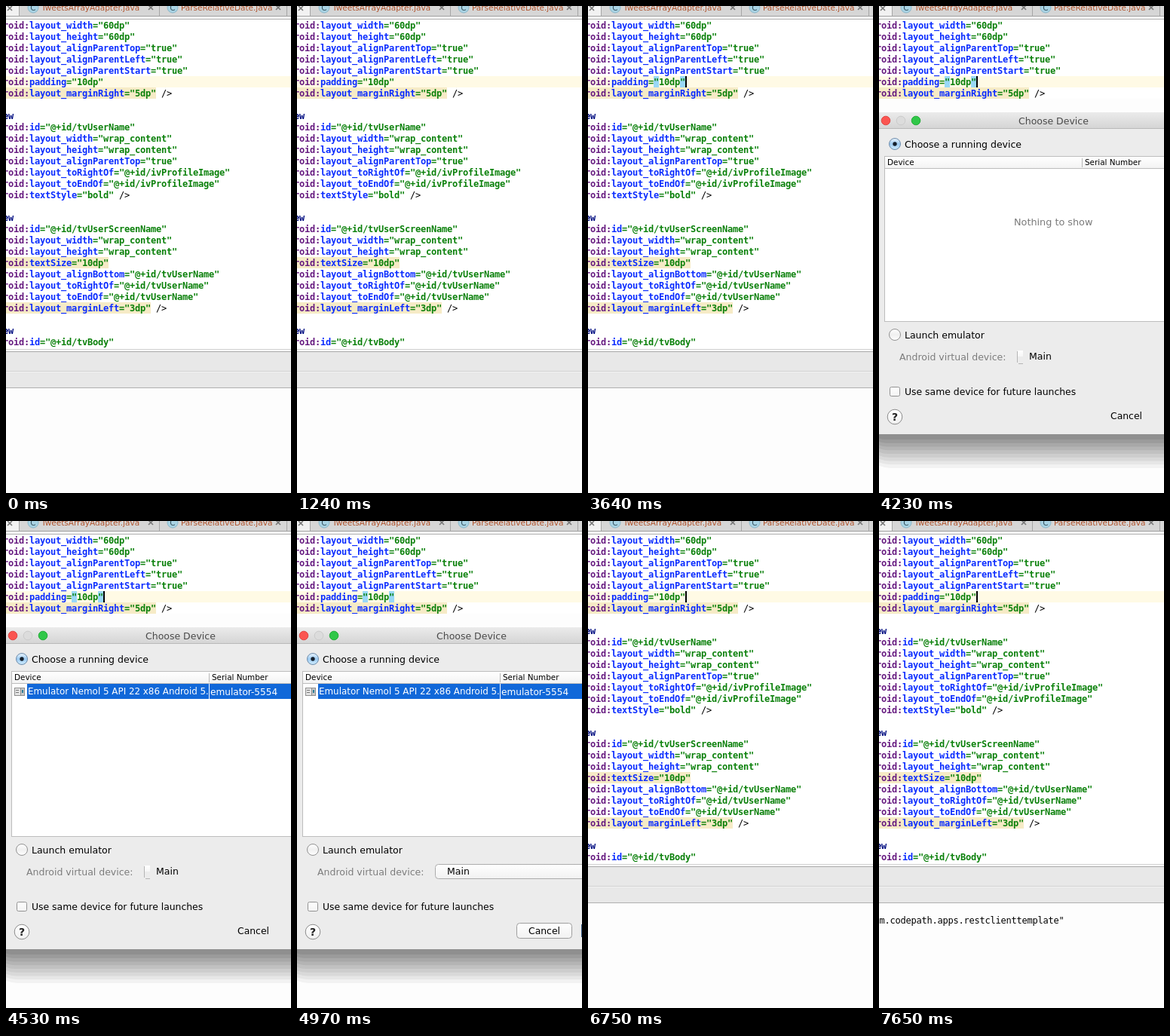
Write an HTML page with a canvas that moves like this. It is 378 by 646 pixels and loops after 8 s.

```html
<!DOCTYPE html>
<html lang="en">
<head>
<meta charset="utf-8">
<title>Layout editor</title>
<style>
html, body { margin: 0; width: 100%; height: 100%; overflow: hidden; background: #fff; }
canvas { display: block; }
</style>
</head>
<body>
<canvas id="stage" width="378" height="646"></canvas>
<script>
const W = 378, H = 646, LOOP = 8000;
const ctx = document.getElementById('stage').getContext('2d');
const MONO = '12px "DejaVu Sans Mono", monospace';
const SANS = '"DejaVu Sans", sans-serif';
const CELL = 7, ROW = 15, LEFT = -4, TOP = 18, CARET_ROW = 5;
const INK = { prefix: '#661a80', name: '#0a2cff', value: '#0a800a', tag: '#000c80', plain: '#000' };

const CODE = [
  'layout_width="60dp"',
  'layout_height="60dp"',
  'layout_alignParentTop="true"',
  'layout_alignParentLeft="true"',
  'layout_alignParentStart="true"',
  'padding="10dp"',
  '!layout_marginRight="5dp" />',
  '',
  'ew',
  'id="@+id/tvUserName"',
  'layout_width="wrap_content"',
  'layout_height="wrap_content"',
  'layout_alignParentTop="true"',
  'layout_toRightOf="@+id/ivProfileImage"',
  'layout_toEndOf="@+id/ivProfileImage"',
  'textStyle="bold" />',
  '',
  'ew',
  'id="@+id/tvUserScreenName"',
  'layout_width="wrap_content"',
  'layout_height="wrap_content"',
  '!textSize="10dp"',
  'layout_alignBottom="@+id/tvUserName"',
  'layout_toRightOf="@+id/tvUserName"',
  'layout_toEndOf="@+id/tvUserName"',
  '!layout_marginLeft="3dp" />',
  '',
  'ew',
  'id="@+id/tvBody"'
];

const between = (t, from, to) => t >= from && t < to;

function rect(x, y, w, h, color) {
  ctx.fillStyle = color;
  ctx.fillRect(x, y, w, h);
}

function roundBox(x, y, w, h, r, fill, stroke) {
  ctx.beginPath();
  ctx.roundRect(x, y, w, h, r);
  ctx.fillStyle = fill;
  ctx.fill();
  if (stroke) {
    ctx.strokeStyle = stroke;
    ctx.lineWidth = 1;
    ctx.stroke();
  }
}

const disc = (x, y, r, fill, stroke) => roundBox(x - r, y - r, 2 * r, 2 * r, r, fill, stroke);

function fade(y0, y1, ...colors) {
  const g = ctx.createLinearGradient(0, y0, 0, y1);
  colors.forEach((c, i) => g.addColorStop(i / (colors.length - 1), c));
  return g;
}

function label(text, x, y, size = 12.5, color = '#000', weight = '') {
  ctx.font = `${weight} ${size}px ${SANS}`;
  ctx.fillStyle = color;
  ctx.fillText(text, x, y);
}

// Draws text on the editor's whole-pixel character grid, returns the end x.
function mono(text, x, y, color, bold = true) {
  ctx.font = (bold ? 'bold ' : '') + MONO;
  ctx.fillStyle = color;
  for (const ch of text) {
    ctx.fillText(ch, x, y);
    x += CELL;
  }
  return x;
}

function codeLine(line, row) {
  const top = TOP + row * ROW, base = top + 12;
  if (!line) return;
  if (line === 'ew') {
    mono(line, LEFT, base, INK.tag);
    return;
  }
  const [, mark, name, value, tail] = line.match(/^(!?)(\w+)(="[^"]*")(.*)$/);
  if (mark) rect(0, top, LEFT + (5 + name.length + value.length) * CELL, ROW, '#f6ebc6');
  let x = mono('roid:', LEFT, base, INK.prefix);
  x = mono(name, x, base, INK.name);
  x = mono(value, x, base, INK.value);
  mono(tail, x, base, INK.plain, false);
}

function cross(x, y) {
  ctx.strokeStyle = '#777';
  ctx.lineWidth = 1.6;
  ctx.beginPath();
  ctx.moveTo(x - 3, y - 3);
  ctx.lineTo(x + 3, y + 3);
  ctx.moveTo(x + 3, y - 3);
  ctx.lineTo(x - 3, y + 3);
  ctx.stroke();
}

function fileTab(x, title, closeX) {
  disc(x, 2, 7, '#a9d3e4', '#8bb8ca');
  label('C', x - 3.7, 6, 10.5, '#34525e');
  label(title, x + 11, 6, 10.5, '#b0532c');
  cross(closeX, 2);
}

function tabBar() {
  rect(0, 0, W, 13, '#d6d6d6');
  rect(0, 0, 17, 13, '#f2f2f2');
  for (const x of [17, 203, 372]) rect(x, 0, 1, 13, '#a6a6a6');
  rect(0, 13, W, 1, '#a2a2a2');
  rect(0, 14, W, 3, '#f4f4f4');
  rect(0, 17, W, 1, '#b4b4b4');
  cross(5, 3);
  fileTab(36, 'TweetsArrayAdapter.java', 192);
  fileTab(221, 'ParseRelativeDate.java', 361);
}

function editor(t) {
  const top = TOP + CARET_ROW * ROW;
  rect(0, 0, W, H, '#fff');
  rect(0, top, W, ROW, '#fffae5');
  if (between(t, 2140, 6750))
    for (const col of [13, 18]) rect(LEFT + col * CELL, top, CELL, ROW, '#99d8f7');
  CODE.forEach(codeLine);
  const caretOn = between(t, 2140, 3040) || between(t, 3640, 4680) ||
    between(t, 6460, 7500) || t >= 7650;
  if (caretOn) rect(129, top, 2, ROW, '#000');
  tabBar();
}

function consolePanel(t) {
  rect(0, 455, W, 1, '#d0d0d0');
  rect(0, 458, W, 1, '#a8a8a8');
  rect(0, 459, W, 48, '#e8e8e8');
  rect(0, 484, W, 1, '#d2d2d2');
  rect(0, 485, W, 1, '#f2f2f2');
  rect(0, 506, W, 1, '#b0b0b0');
  rect(0, 507, W, H - 507, '#fdfdfd');
  if (t >= 7350) mono('m.codepath.apps.restclienttemplate"', 0.5, 534, '#000', false);
}

function dialogShadow() {
  rect(0, 123, W, H - 123, '#fdfdfd');
  const bands = 9;
  for (let i = 0; i < bands; i++) {
    const k = i / (bands - 1), tone = Math.round(242 - 99 * k);
    roundBox(-26 + 14 * k, 300, 500, 313 - 300 * 0 - 38 * k, 42 - 22 * k, `rgb(${tone},${tone},${tone})`);
  }
}

function deviceTable(filled) {
  rect(7, 199, W, 220, '#bdbdbd');
  rect(8, 200, W, 15, fade(200, 215, '#fff', '#f3f3f3'));
  rect(8, 216, W, 202, '#fff');
  rect(269, 202, 1, 12, '#b8b8b8');
  label('Device', 11, 211, 10.4);
  label('Serial Number', 273, 211, 10.4);
  if (!filled) {
    label('Nothing to show', 179, 291, 12.8, '#7a7a7a');
    return;
  }
  rect(28, 216, W - 28, 20, '#1168d9');
  rect(269, 216, 1, 20, '#fff');
  rect(11, 221, 14, 11, '#8d8d8d');
  rect(12, 222, 7, 9, '#e4e4e4');
  rect(13, 224, 4, 1, '#777');
  rect(13, 227, 4, 1, '#777');
  rect(20, 222, 4, 9, '#c9c9c9');
  rect(21, 224, 2, 4, '#2f7d96');
  label('Emulator Nemol 5 API 22 x86 Android 5.', 29, 230, 11.9, '#fff');
  label('emulator-5554', 271, 231, 12.1, '#fff');
}

function dialogControls(painted) {
  disc(21, 183, 7.5, fade(175, 191, '#f2f9ff', '#9ccbf2', '#d3efff'), '#6d8cab');
  disc(21, 183, 2.7, '#15202c');
  label('Choose a running device', 34, 188);
  disc(21, 436, 7.5, fade(428, 444, '#fff', '#f0f0f0', '#fff'), '#929292');
  label('Launch emulator', 34, 441);
  label('Android virtual device:', 27, 470, 12.5, '#7c7c7c');

  if (painted) {
    roundBox(183.5, 455.5, 220, 19, 4, fade(455, 475, '#fff', '#f1f1f1'), '#acacac');
    roundBox(291.5, 533.5, 73, 20, 4, fade(533, 554, '#fff', '#f1f1f1'), '#9e9e9e');
    rect(377, 535, 1, 17, '#32537f');
  } else {
    roundBox(183.5, 455.5, 9, 19, [4, 0, 0, 4], '#ececec');
    rect(184, 457, 7, 8, fade(457, 465, '#fff', '#f6f6f6'));
    rect(183, 458, 1, 15, '#b5b5b5');
    rect(185, 474, 6, 1, '#b5b5b5');
  }
  label('Main', 199, 469);
  roundBox(14.5, 505.5, 13, 12, 2, fade(505, 518, '#fff', '#f2f2f2'), '#929292');
  label('Use same device for future launches', 34, 516, 12.4);
  disc(21, 545, 9.8, fade(535, 555, '#fff', '#f0f0f0'), '#8c8c8c');
  label('?', 17, 550, 14, '#222', 'bold');
  label('Cancel', 307, 548, 12.4);
}

function dialog(t) {
  dialogShadow();
  rect(0, 141, W, 427, '#ececec');
  rect(0, 141, W, 22, fade(141, 163, '#ebebeb', '#d4d4d4'));
  rect(0, 162, W, 1, '#b9b9b9');
  disc(9, 152, 5.8, '#fb5551', '#df4744');
  disc(29, 152, 5.8, '#dcdcdc', '#cbcbcb');
  disc(49, 152, 5.8, '#30c748', '#24ac38');
  label('Choose Device', 185, 157, 12.5, '#4a4a4a');
  deviceTable(t >= 4530);
  dialogControls(t >= 4680);
}

function arrow(x, y) {
  const points = [[1, 1], [1, 14], [4, 11.2], [6.2, 16.3], [8.6, 15.2], [6.4, 10.3], [10.6, 10.3]];
  ctx.beginPath();
  for (const [dx, dy] of points) ctx.lineTo(x + dx, y + dy);
  ctx.closePath();
  ctx.strokeStyle = '#fff';
  ctx.lineWidth = 2;
  ctx.stroke();
  ctx.fillStyle = '#000';
  ctx.fill();
}

function textPointer(x, y) {
  ctx.strokeStyle = '#222';
  ctx.lineWidth = 1;
  ctx.beginPath();
  ctx.moveTo(x + 1, y + 0.5);
  ctx.quadraticCurveTo(x + 4.5, y + 0.5, x + 4.5, y + 3);
  ctx.lineTo(x + 4.5, y + 14);
  ctx.quadraticCurveTo(x + 4.5, y + 16.5, x + 1, y + 16.5);
  ctx.moveTo(x + 8, y + 0.5);
  ctx.quadraticCurveTo(x + 4.5, y + 0.5, x + 4.5, y + 3);
  ctx.moveTo(x + 8, y + 16.5);
  ctx.quadraticCurveTo(x + 4.5, y + 16.5, x + 4.5, y + 14);
  ctx.moveTo(x + 2.5, y + 11.5);
  ctx.lineTo(x + 6.5, y + 11.5);
  ctx.stroke();
}

const POINTER = [
  [500, 800, arrow, 134, 188],
  [800, 940, arrow, 62, 68],
  [940, 1090, arrow, 35, 47],
  [1090, 1240, arrow, 3, 20],
  [4380, 4530, arrow, 274, 342],
  [6460, 6610, textPointer, 161, 398]
];

function draw(t) {
  editor(t);
  if (between(t, 4230, 6160)) dialog(t);
  else consolePanel(t);
  for (const [from, to, shape, x, y] of POINTER)
    if (between(t, from, to)) shape(x, y);
}

const start = performance.now();
function tick() {
  draw((performance.now() - start) % LOOP);
  requestAnimationFrame(tick);
}
tick();
</script>
</body>
</html>
```
